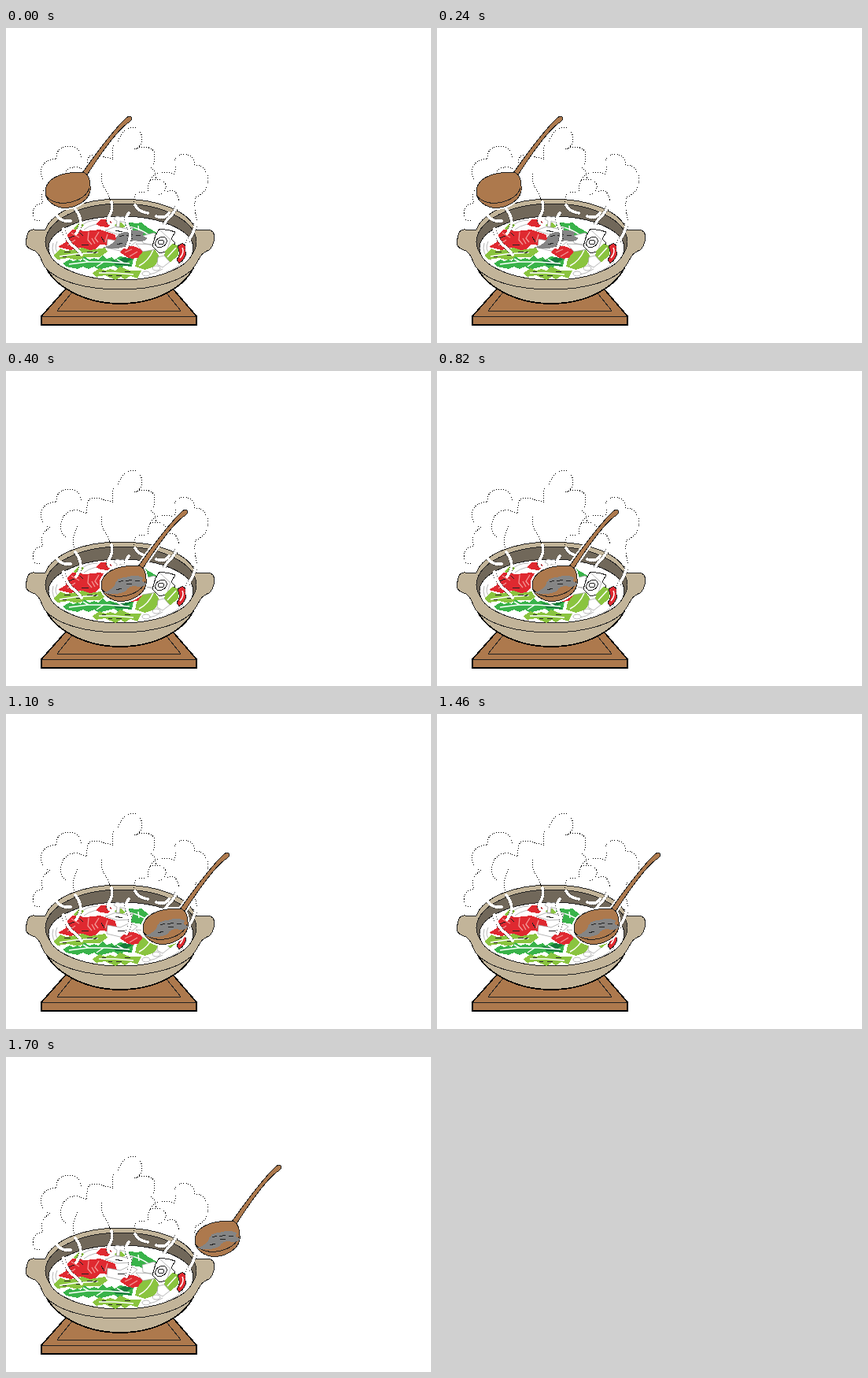
An HTML page that plays this animation: 540x400 px, repeating every 2 s.

```html
<!DOCTYPE html>
<html lang="en">
<head>
<meta charset="utf-8">
<title>Hot pot</title>
<style>
html, body { margin: 0; width: 100%; height: 100%; overflow: hidden; background: #fff; }
svg { display: block; width: 540px; height: 400px; fill: none; shape-rendering: crispEdges; stroke-linejoin: round; }
.line { stroke: #222; }
.bold { stroke: #000; stroke-width: 1.7; }
.wood { fill: #ad794d; }
.clay { fill: #c2b499; }
.inside { fill: #71685a; }
.broth { fill: #fff; }
.meat { fill: #858585; }
.red { fill: #df2930; }
.leaf { fill: #39b34a; }
.deep { fill: #177b3b; }
.lime { fill: #8ac43f; }
.pale { fill: #fff; stroke: #999; stroke-width: .7; shape-rendering: auto; }
.shine { stroke: #fff; stroke-width: 1.5; shape-rendering: auto; }
.pink { stroke: #f39a98; stroke-width: 1.3; shape-rendering: auto; }
.dots { stroke: #000; stroke-dasharray: 1 2; }
.edge { stroke: #333; stroke-width: 5; stroke-dasharray: 1 2; }
.wisp { stroke: #fff; stroke-width: 3.6; stroke-linecap: round; }
.halo { fill: #fff; stroke: #fff; stroke-width: 5; }
</style>
</head>
<body>
<svg viewBox="0 0 540 400">
  <defs>
    <g id="spoon">
      <path d="M97 184C114 160 136 130 152 115Q157 110 160 114Q160 118 154 121C139 133 120 160 102 188Z"/>
      <path d="M50 207C51 190 74 181 100 184Q108 189 107 207C104 222 82 232 66 227Q50 221 50 207Z"/>
    </g>
    <g id="slice">
      <path class="meat" d="M139 269Q141 259 153 259Q165 255 175 259L174 264L180 267Q174 273 165 270Q156 270 154 276Q145 281 134 280L123 279Q136 275 139 269Z"/>
      <path class="line" d="M144 265l6-2m4 5l7-1m4-4l6 1m-23 9l-7 2m20-13l-8 2"/>
    </g>
    <g id="wisps">
      <path d="M65 239Q70 246 82 245"/>
      <path d="M88 230Q94 237 95 247Q94 255 89 261"/>
      <path d="M73 255Q75 266 83 275Q91 280 96 288"/>
      <path d="M134 221Q136 231 132 237Q128 243 131 248"/>
      <path d="M156 235Q150 242 155 251Q161 264 153 279"/>
      <path d="M164 225Q168 233 180 235M191 239Q202 243 207 235"/>
      <path d="M218 224Q216 231 210 238Q201 246 201 252"/>
      <path d="M241 248Q239 260 233 268Q228 275 230 283"/>
    </g>
  </defs>

  <!-- board -->
  <path class="wood bold" d="M77 330H211L242 366V377H45V366Z"/>
  <path class="line" d="M45 366H242M86 333L65 359H222L201 333"/>

  <!-- pot -->
  <path class="clay bold" d="M49 300C59 326 97 350 145 350S230 327 240 300Z"/>
  <path class="clay line" d="M50 256H36Q29 255 27 263L25 272Q25 278 32 281C43 284 43 292 49 303C65 322 101 332 145 332S227 321 240 302C247 291 247 286 258 282Q263 278 265 267Q265 257 257 256H241C232 232 193 217 145 217S59 233 50 256Z"/>
  <ellipse class="inside line" cx="146" cy="271.500" rx="96" ry="48.500"/>
  <ellipse class="broth line" cx="146" cy="279.500" rx="92" ry="40.500"/>

  <!-- ingredients -->
  <path class="pale" d="M60 273q-4 14 9 22m-4-24q-5 11 3 16M94 253q8-9 22-9m-17 12q12-9 29-7m75 61q13-4 22-13m-47 17q12-2 21-8"/>
  <path class="red" d="M114 249L120 243Q130 241 134 247L130 253L120 252Z"/>
  <path class="red" d="M78 262L85 256L101 258L119 256L138 262L141 270L132 276L119 275L111 283L95 279L82 282L66 278L76 272Z"/>
  <path class="pink" d="M83 260l10 6m12-7l-1 10 5 6m9-16l-5 8 4 5m12-10l-3 10m-38-3l-10 7m31-9l4 7"/>
  <path class="line" d="M79 267l8-3m9 11l9 1m16-11l4 7m-31-12l4 4"/>
  <path class="leaf" d="M150 250L157 247L166 248L172 247L181 254L192 260L190 264L193 268L183 272L169 266L158 265L161 256Z"/>
  <path class="shine" d="M156 252q17 3 31 15m-19-16l1 8"/>
  <path class="lime" d="M85 255l8-7 6 2-7 7zM137 250l9-3 6 5-8 4z"/>
  <path class="pale" d="M137 243q2-6 8-3q7-2 9 4q-5 4-9 1l-1 8h-4l1-8zM126 257l14-5 13 3 9-2-5 8-15 1zM129 268l16 3 13-6 9 5-10 8-12 5-17-4z"/>
  <path class="line" d="M139 257l9 2m-6 16l9 0m8-7l-6 8"/>
  <path class="red" d="M145 285Q151 276 162 277L175 282L169 292L157 293Z"/>
  <path class="pink" d="M151 285l9-4m-3 9l10-6"/>
  <path class="lime" d="M61 289L69 280L76 283L84 282L97 279L106 282L114 281L126 279L129 284L119 291L102 291L91 295L79 292L65 294Z"/>
  <path class="shine" d="M68 290l20-3 29-2"/>
  <path class="line" d="M74 285l8-1m7 5l7-1m7-4l7 1m-38 6l5-1m34-4l5-2"/>
  <path class="leaf" d="M72 299L81 294L85 296L91 294L95 296L99 290L106 294L112 292L117 294L123 289L128 293L134 291L138 294L145 290L162 293L160 303L150 302L144 306L137 302L129 304L118 307L112 303L105 306L98 303L91 306L77 303Z"/>
  <path class="deep" d="M132 294L140 296L150 291L161 293L153 298L160 302L139 301Z"/>
  <path class="shine" d="M80 300l24-3 24 0 29 2m-52-2l-7-4m26 4l-9 6m34-5l-8-4"/>
  <path class="lime" d="M110 311L119 305L126 308L132 306L139 308L145 303L157 308L172 308L167 318L158 315L151 319L146 316L139 320L126 314L114 316Z"/>
  <path class="shine" d="M118 311l20 0 24 2"/>
  <path class="line" d="M122 309l5 1m13 5l7-1m4-5l7 1m-28 4l5 1"/>
  <path class="lime" d="M166 294L176 281L188 279L196 292L188 303L176 307L164 303Z"/>
  <path class="shine" d="M169 302q12-6 18-20"/>
  <path class="pale" d="M173 264l15-4 13 8-9 9-18-4zm-8 10l20 1 6 6-17 3z"/>
  <path class="broth line" d="M190 263l5-8 13 2 7 2-5 9 5 5-7 10-13 3-9-9z"/>
  <path class="pale" d="M195 256l14 13m0 0l-5 15"/>
  <ellipse class="line" cx="197" cy="272" rx="8" ry="6" transform="rotate(-35 197 272)"/>
  <ellipse class="line" cx="197" cy="272" rx="4" ry="3"/>
  <path class="lime" d="M202 283l9-9 9 3-1 12-10 8-8-5z"/>
  <path class="shine" d="M205 291l11-12"/>
  <path class="red line" d="M218 277q9-8 11 4q1 11-9 18l-3-5q6-6 1-17z"/>
  <path class="shine" d="M224 279q3 6-3 13"/>
  <path class="pale" d="M193 291l8-2 7 8-9 7-7-4zM173 312a5 3 0 1 0 10 0a5 3 0 1 0-10 0m13-7a5 3 0 1 0 10 0a5 3 0 1 0-10 0"/>
  <use id="inPot" href="#slice"/>

  <!-- steam -->
  <path class="dots" d="M43 244Q34 246 34 236Q35 224 47 222Q41 207 56 199Q43 195 45 179Q49 165 64 167Q63 151 79 150Q96 151 95 165M76 211Q68 205 70 192Q75 175 92 177L103 181Q102 163 109 161L120 162L136 167Q133 147 142 144Q149 126 164 126Q175 132 172 146Q168 154 163 154Q181 147 188 157Q191 169 184 178Q191 181 190 192"/>
  <path class="dots" d="M91 197Q83 210 87 227M122 185Q119 197 127 206L133 219M163 221Q161 208 176 208M181 207Q178 193 192 185Q205 181 213 186Q217 178 214 171Q216 160 226 160Q240 162 240 174Q253 174 257 191Q258 207 241 215Q238 226 243 246M183 194Q197 189 203 199Q204 210 193 212M205 208Q216 202 220 219"/>
  <use href="#wisps" class="edge"/>
  <use href="#wisps" class="wisp"/>

  <g id="ladle">
    <use href="#spoon" class="halo"/>
    <use href="#spoon" class="wood line"/>
    <path class="line" d="M51 213C62 230 101 222 106 203"/>
    <use id="served" href="#slice" x="-72" y="-61"/>
  </g>
</svg>
<script>
const byId = id => document.getElementById(id);
const show = (id, on) => byId(id).setAttribute("visibility", on ? "visible" : "hidden");
const poses = [
  { until: 400, x: 0, y: 0 },
  { until: 1100, x: 71, y: 64 },
  { until: 1700, x: 124, y: 64 },
  { until: 2000, x: 190, y: 25 }
];

function draw() {
  const time = performance.now() % 2000;
  const pose = poses.find(p => time < p.until);
  const empty = pose === poses[0];
  byId("ladle").setAttribute("transform", `translate(${pose.x} ${pose.y})`);
  show("inPot", empty);
  show("served", !empty);
  requestAnimationFrame(draw);
}
draw();
</script>
</body>
</html>
```
